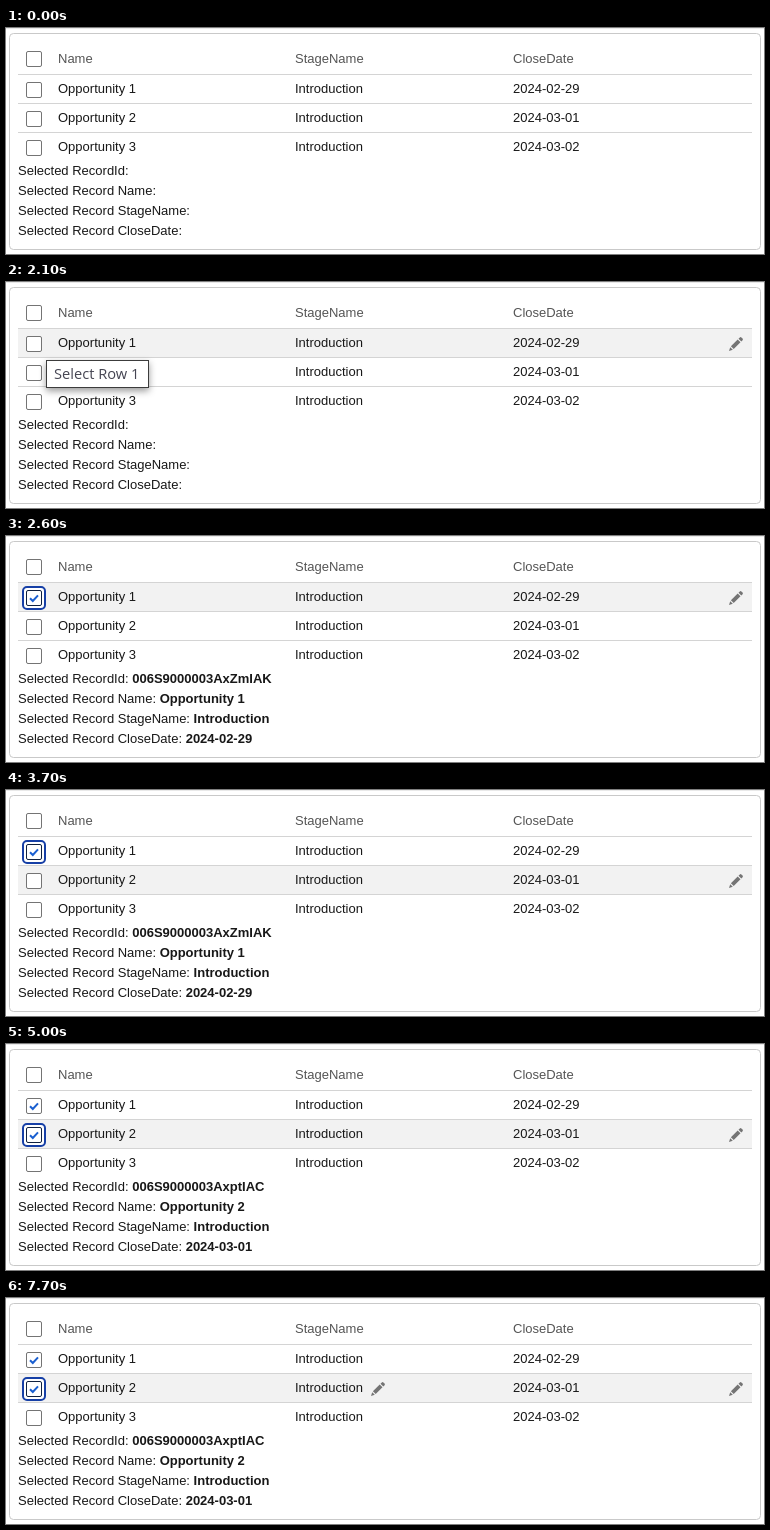
Animation of 758x226 px, one loop 8 s. Source, as an HTML page:

```html
<!DOCTYPE html>
<html lang="en">
<head>
<meta charset="utf-8">
<style>
  html, body { margin: 0; width: 100%; height: 100%; overflow: hidden; background: #fff; }
  svg { display: block; font: 13px "Liberation Sans", Arial, sans-serif; fill: #181818; }
  .head { fill: #555; }
  .line { fill: #d4d4d4; }
  .hover { fill: #f2f2f2; }
  .box { fill: #fff; stroke: #747474; }
  .focus { stroke: #10213f; }
  .ring { fill: #fff; stroke: #163fa6; stroke-width: 2; }
  .check { fill: none; stroke: #1a5fd0; stroke-width: 2; }
  .pencil { fill: #747474; }
  .tip rect { fill: #fff; stroke: #3c3c3c; filter: drop-shadow(0 3px 3.5px rgba(0, 0, 0, .4)); }
  .tip text { font: 14.67px "Open Sans", "Noto Sans", sans-serif; fill: #454552; }
</style>
</head>
<body>
<svg id="stage" width="758" height="226" viewBox="0 0 758 226"></svg>
<script>
const LOOP = 8000;
const stage = document.getElementById('stage');
const columns = [52, 289, 507];
const header = ['Name', 'StageName', 'CloseDate'];
const rows = [
  ['Opportunity 1', 'Introduction', '2024-02-29'],
  ['Opportunity 2', 'Introduction', '2024-03-01'],
  ['Opportunity 3', 'Introduction', '2024-03-02']
];
const ids = ['006S9000003AxZmIAK', '006S9000003AxptIAC'];
const labels = ['RecordId', 'Record Name', 'Record StageName', 'Record CloseDate'];

// Each step changes part of the state; row numbers start at 0, -1 means none.
const steps = [
  [0, { hover: -1, focus: -1, checked: 0, shown: -1, tip: -1, cell: 0 }],
  [800, { hover: 2 }],
  [900, { hover: 1 }],
  [1000, { hover: 0 }],
  [2100, { tip: 0 }],
  [2300, { tip: -1 }],
  [2500, { checked: 1, focus: 0 }],
  [2600, { shown: 0 }],
  [3700, { hover: 1 }],
  [4500, { tip: 1 }],
  [4600, { tip: -1 }],
  [4800, { checked: 2, focus: 1 }],
  [4900, { shown: 1 }],
  [7400, { cell: 137 }],
  [7700, { cell: 364 }]
];

const rowTop = i => 47 + 29 * i;
const text = (x, y, s, cls = '') => `<text x="${x}" y="${y}" class="${cls}">${s}</text>`;
const rect = (x, y, w, h, cls, r = 0) =>
  `<rect x="${x}" y="${y}" width="${w}" height="${h}" rx="${r}" class="${cls}"/>`;
const cells = (list, y, cls) => list.map((s, i) => text(columns[i], y, s, cls)).join('');
const pencil = (x, y) => `<path class="pencil" transform="translate(${x} ${y})"
  d="M1 15L2.2 11.2 4.8 13.8zM2.9 10.3L9.7 3.5 12.5 6.3 5.7 13.1zM10.5 2.7L11.8 1.4Q12.6.7 13.4 1.4L14.6 2.6Q15.3 3.4 14.6 4.2L13.3 5.5z"/>`;

function checkbox(y, checked, focus) {
  return (focus ? rect(17, y - 3, 22, 22, 'ring', 4) : '') +
    rect(20.5, y + .5, 15, 15, focus ? 'box focus' : 'box', 1.5) +
    (checked ? `<path class="check" d="M24 ${y + 8.2}l2.8 2.8 5.2 -5.6"/>` : '');
}

function row(i, s) {
  const y = rowTop(i), hover = i === s.hover;
  return (hover ? rect(12, y, 734, 28, 'hover') : '') +
    rect(12, y - 1, 734, 1, 'line') +
    cells(rows[i], y + 18) +
    (hover ? pencil(722, y + 7) + (s.cell ? pencil(s.cell, y + 7) : '') : '');
}

function tooltip(i) {
  const x = 40 - i, y = 78 + 27 * i;
  return `<g class="tip">${rect(x + .5, y + .5, 102, 27, '')}${text(x + 8, y + 19, 'Select Row ' + (i + 1))}</g>`;
}

function details(i) {
  const values = i < 0 ? [] : [ids[i], ...rows[i]];
  return labels.map((label, n) => text(12, 147 + 20 * n,
    `Selected ${label}: <tspan font-weight="bold">${values[n] || ''}</tspan>`)).join('');
}

function draw(s) {
  stage.innerHTML =
    rect(0, 0, 758, 1, 'line" opacity=".5') +
    '<rect x="3.5" y="5.5" width="751" height="216" rx="4" fill="#fff" stroke="#c9c9c9"/>' +
    cells(header, 35, 'head') + checkbox(23) +
    rows.map((_, i) => row(i, s)).join('') +
    rows.map((_, i) => checkbox(rowTop(i) + 7, i < s.checked, i === s.focus)).join('') +
    details(s.shown) +
    (s.tip < 0 ? '' : tooltip(s.tip));
}

let current = 0;
function frame(now) {
  const t = now % LOOP;
  const past = steps.filter(([at]) => at <= t);
  if (past.length !== current) {
    current = past.length;
    draw(Object.assign({}, ...past.map(([, change]) => change)));
  }
  requestAnimationFrame(frame);
}
frame(0);
</script>
</body>
</html>
```
